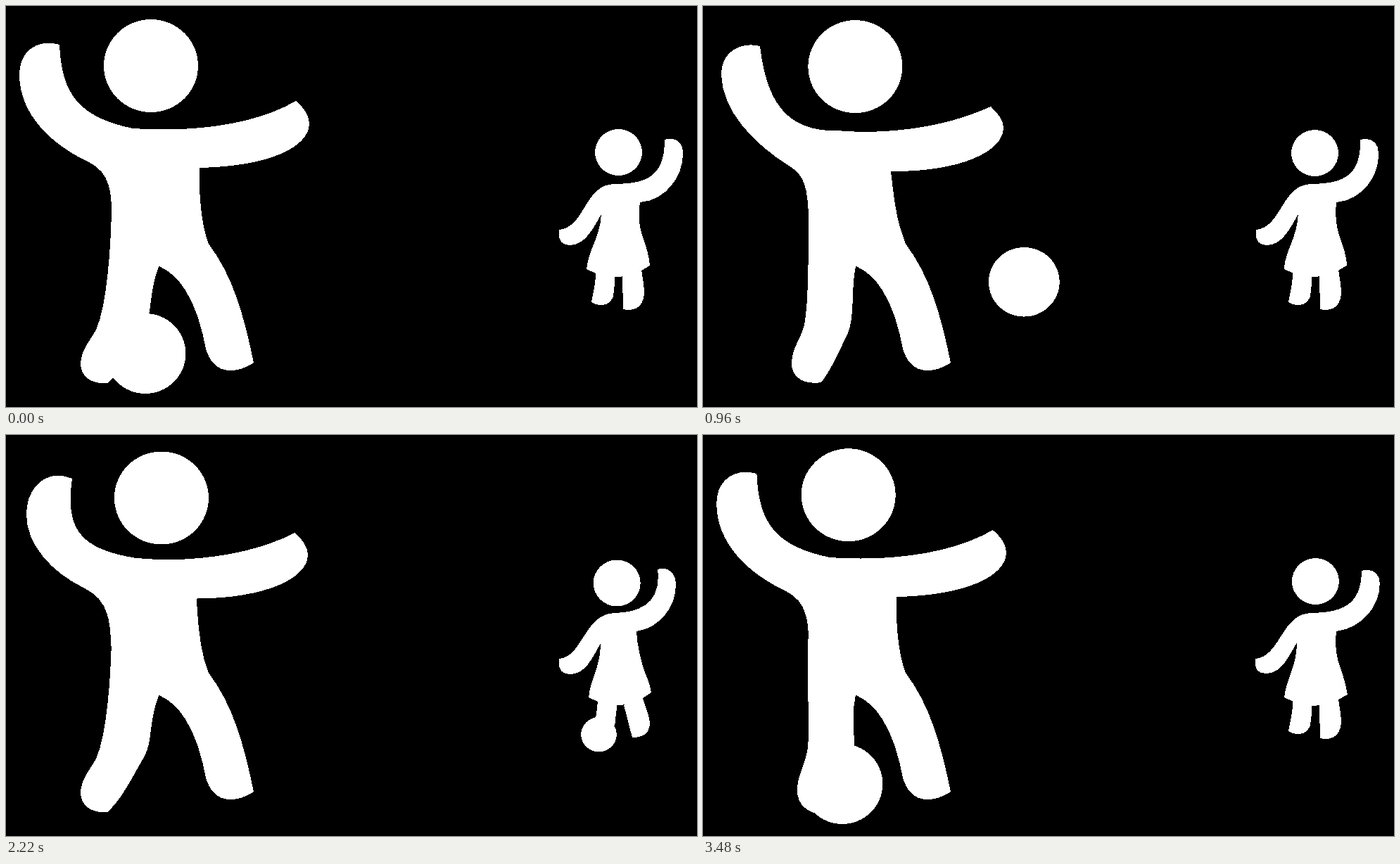
Animation, 982 px wide and 570 px high, one loop 3.51 s. Source, as an HTML page:

```html
<!DOCTYPE html>
<html lang="en">
<head>
<meta charset="utf-8">
<title>Playing ball</title>
<style>
html, body { margin: 0; width: 100%; height: 100%; overflow: hidden; background: #000; }
svg { display: block; width: 982px; height: 570px; fill: #fff; shape-rendering: crispEdges; }
svg * { animation: 3510ms linear infinite; }

#ball { animation-name: ball; }
@keyframes ball {
  0%, 18.5% { cx: 198px; cy: 494px; rx: 57.4px; ry: 57px; }
  19.66% { cx: 232px; cy: 483.5px; rx: 57px; ry: 56.5px; }
  27.35% { cx: 455.7px; cy: 392.5px; rx: 50.4px; ry: 49.3px; }
  34.19% { cx: 602px; cy: 340px; rx: 44px; ry: 43px; }
  41.03% { cx: 725.5px; cy: 301.7px; rx: 37.4px; ry: 36.6px; }
  44.44% { cx: 777px; cy: 308px; rx: 34px; ry: 33px; }
  48.43% { cx: 818px; cy: 350px; rx: 30px; ry: 29px; }
  53.85%, 78.1% { cx: 842.5px; cy: 425.7px; rx: 25.3px; ry: 24.7px; }
  79.49% { cx: 803.7px; cy: 427px; rx: 28.8px; ry: 28.2px; }
  92.6%, 100% { cx: 198px; cy: 496px; rx: 57.4px; ry: 57px; }
}

#manHead { animation-name: man-head; }
@keyframes man-head {
  0%, 20.5%, 100% { cx: 206px; cy: 85px; }
  26% { cx: 216.2px; cy: 86px; }
  79.49% { cx: 223px; cy: 91px; }
}

#backArm { animation-name: back-arm; }
@keyframes back-arm {
  0%, 100% { d: path("M76,55 C46,46 19,63 19,97 C19,155 66,198 118,222 C143,235 151,255 150,300 L230,300 L215,176 L180,174 C105,158 79,127 76,55Z"); }
  19.66% { d: path("M87,64 C56,54 29,74 29,107 C29,153 66,202 122,231 C143,240 151,255 152,300 L230,300 L215,179 L175,177 C115,174 90,130 87,64Z"); }
  27.35% { d: path("M81,57 C52,50 26,66 26,97 C27,148 70,195 125,229 C142,240 149,255 150,300 L230,300 L215,178 L178,177 C116,173 90,133 81,57Z"); }
  37.61% { d: path("M64,55 C37,52 16,70 16,97 C17,140 58,187 118,223 C143,238 149,256 149,300 L230,300 L215,178 L185,176 C123,173 97,141 64,55Z"); }
  63.25% { d: path("M94,62 C60,47 29,72 29,113 C29,156 65,195 110,217 C138,231 149,250 149,300 L230,300 L215,177 L185,175 C105,162 84,134 94,62Z"); }
}

#frontArm { animation-name: front-arm; }
@keyframes front-arm {
  0%, 100% { d: path("M180,174 C270,180 355,168 412,135 C422,143 431,155 431,167 C431,200 375,228 275,230 C274,265 277,310 288,338 L180,338Z"); }
  19.66% { d: path("M180,177 C265,184 345,177 410,149 C421,158 427,170 427,181 C427,212 365,241 266,236 C271,270 275,310 288,338 L180,338Z"); }
  27.35% { d: path("M180,177 C265,184 345,172 409,143 C420,153 427,163 427,173 C427,207 365,236 267,235 C271,270 275,310 288,338 L180,338Z"); }
}

#kickLeg { animation-name: kick-leg; }
@keyframes kick-leg {
  0%, 41.03%, 79.49% { d: path("M150,290 C149,345 143,428 128,460 C118,478 106,490 106,510 C107,527 122,538 144,536 C165,518 184,478 196,458 C209,435 202,410 217,371 L217,290Z"); }
  19.66% { d: path("M152,290 C152,350 154,440 145,470 C140,488 138,500 138,512 C140,530 156,542 183,537 C195,515 202,490 206,470 C215,440 212,400 219,368 L219,290Z"); }
  27.35% { d: path("M150,290 C150,350 150,425 144,453 C139,475 126,485 126,510 C127,527 142,539 168,535 C182,518 196,485 206,465 C216,440 210,405 217,370 L217,290Z"); }
  99.15%, 100% { d: path("M149,290 C147,350 153,425 148,450 C142,478 133,485 134,510 C136,524 144,532 157,537 C176,530 200,490 211,465 C220,440 209,405 217,369 L217,290Z"); }
}

#girlHead { animation-name: girl-head; }
@keyframes girl-head {
  0%, 100% { cx: 870.5px; cy: 208px; }
  63.25% { cx: 868.2px; cy: 210.5px; }
}

#girlBody { animation-name: girl-body; }
@keyframes girl-body {
  0%, 15.38%, 19.66% { d: path("M936,190 C950,186 962,192 962,210 C962,245 935,277 901,279 C898,300 900,315 905,328 C909,340 914,355 915,369 L903,376 Q870,392 838,380 L825,374 C828,345 844,330 846,296 C835,315 823,341 800,340 C788,339 785,332 786,318 C823,315 822,253 865,253 C905,252 936,247 936,190Z"); }
  7.69% { d: path("M952,193 C966,190 975,200 975,217 C972,250 940,277 903,279 C899,300 900,315 905,328 C909,340 914,355 915,369 L903,376 Q870,392 838,380 L825,374 C828,345 844,330 846,296 C835,315 823,341 800,340 C788,339 785,332 786,318 C823,315 822,253 865,253 C915,251 948,247 952,193Z"); }
  63.25% { d: path("M926,191 C940,186 952,196 952,213 C952,245 928,275 896,279 C897,300 902,318 906,332 C911,345 916,357 917,366 L905,374 Q870,392 841,379 L828,373 C831,345 845,330 845,296 C832,320 822,341 800,340 C788,339 785,332 786,318 C820,315 822,254 865,253 C900,252 932,240 926,191Z"); }
  79.49% { d: path("M933,194 C946,190 957,198 957,214 C957,245 930,276 898,279 C897,300 901,316 905,330 C909,343 913,357 914,370 L901,377 Q870,392 839,379 L826,373 C829,345 844,330 844,295 C832,315 822,340 799,339 C787,338 784,332 785,318 C821,315 822,253 865,253 C903,252 933,246 933,194Z"); }
  100% { d: path("M936,193 C950,189 962,195 962,211 C962,245 935,275 900,279 C898,300 900,315 905,328 C909,340 914,355 916,369 L903,376 Q870,392 839,379 L826,373 C829,345 844,330 844,295 C832,315 822,340 799,339 C787,338 784,332 785,318 C821,315 822,253 865,253 C905,252 936,244 936,193Z"); }
}

#girlLegs { animation-name: girl-legs; }
@keyframes girl-legs {
  0%, 53.85%, 100% { d: path("M838,378 C838,395 835,405 832,421 C846,430 864,425 864,405 C865,395 865,392 865,384Z M876,384 C876,400 877,415 877,431 C897,435 907,425 907,405 C906,390 904,385 903,374Z"); }
  63.25% { d: path("M841,378 C840,392 838,400 836,418 C850,430 867,420 866,405 C867,395 868,392 868,384Z M878,384 C882,398 886,415 890,430 C906,430 915,424 915,408 C913,395 908,385 905,374Z"); }
  78.1%, 79.49% { d: path("M840,378 C838,395 835,405 832,421 C847,430 865,424 865,405 C866,395 866,392 866,384Z M874,384 C875,400 876,415 877,434 C896,436 906,427 906,410 C905,395 902,386 901,375Z"); }
}
</style>
</head>
<body>
<svg viewBox="0 0 982 570">
  <g id="man">
    <ellipse id="manHead" rx="67" ry="66"/>
    <path id="backArm"/>
    <path id="frontArm"/>
    <path id="kickLeg"/>
    <path id="standLeg" d="M288,338 C322,384 337,435 352,507 C340,515 330,518 318,518 C300,518 289,505 284,487 C275,440 258,388 218,370 L158,370 L158,280 L268,280Z"/>
  </g>
  <g id="girl">
    <ellipse id="girlHead" rx="33.5" ry="33"/>
    <path id="girlBody"/>
    <path id="girlLegs"/>
  </g>
  <ellipse id="ball"/>
</svg>
</body>
</html>
```
